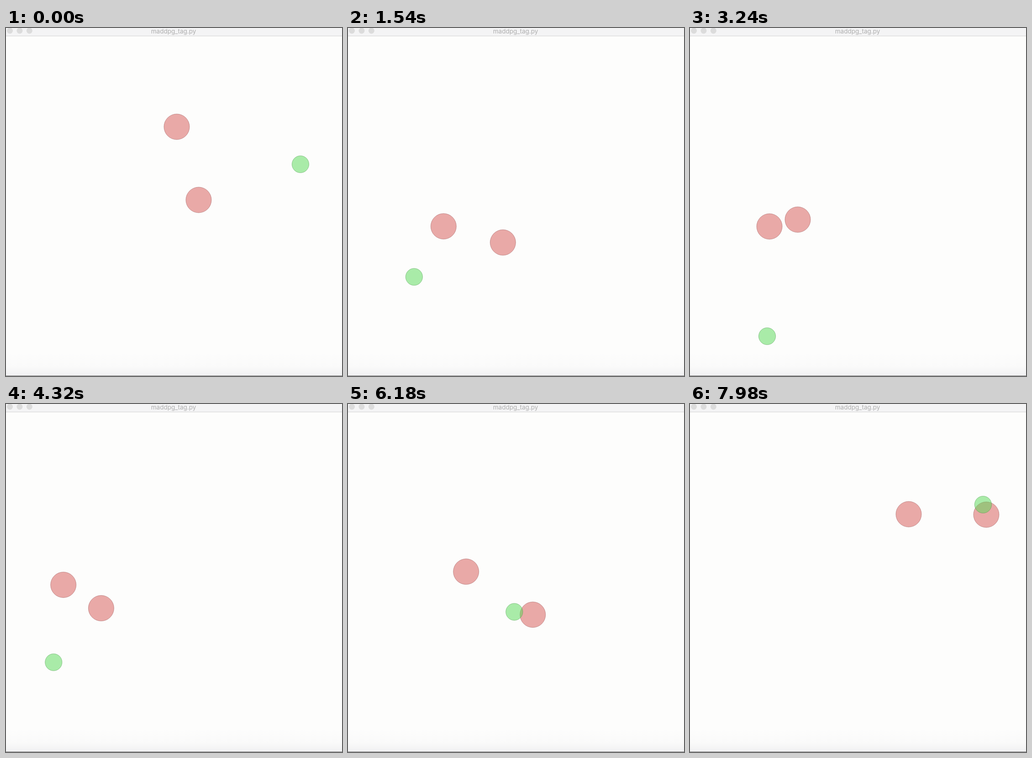
Animation of 736x761 px, one loop 8 s. Source, as an HTML page:

```html
<!DOCTYPE html>
<html lang="en">
<head>
<meta charset="utf-8">
<title>maddpg_tag.py</title>
<style>
  html, body { margin: 0; width: 100%; height: 100%; overflow: hidden; background: #fdfdfc; }
  svg { display: block; width: 100%; height: 100%; }
  text { font: 13.5px Inter, "Liberation Sans", sans-serif; fill: #aeaeae; text-anchor: middle; }
  .chaser { fill: rgba(214, 86, 85, .5); stroke: rgba(140, 65, 65, .45); }
  .runner { fill: rgba(87, 218, 87, .5); stroke: rgba(60, 140, 60, .45); }
</style>
</head>
<body>
<svg viewBox="0 0 736 761">
  <defs>
    <linearGradient id="shade" x1="0" y1="0" x2="0" y2="1">
      <stop offset="0" stop-color="#fdfdfc"/>
      <stop offset=".6" stop-color="#fafafa"/>
      <stop offset="1" stop-color="#f1f1f2"/>
    </linearGradient>
  </defs>
  <rect width="736" height="761" fill="#fdfdfc"/>
  <rect y="710" width="736" height="50" fill="url(#shade)"/>
  <rect y="760" width="736" height="1" fill="#747474"/>
  <rect width="736" height="17" fill="#f4f4f5"/>
  <rect y="17" width="736" height="1" fill="#d3d3d3"/>
  <g id="buttons" fill="#dcdcdc"></g>
  <text x="367" y="12">maddpg_tag.py</text>
  <g id="agents"></g>
</svg>
<script>
const LOOP = 8000;

function addCircle(parent, attrs) {
  const node = document.createElementNS('http://www.w3.org/2000/svg', 'circle');
  document.getElementById(parent).append(node);
  return set(node, attrs);
}

function set(node, attrs) {
  for (const name in attrs) node.setAttribute(name, attrs[name]);
  return node;
}

for (let i = 0; i < 3; i++) addCircle('buttons', { cx: 8.5 + 21.4 * i, cy: 6, r: 6.5 });

function agent(kind, r, ...path) {
  return { path, node: addCircle('agents', { class: kind, r }) };
}

// Each agent steers through a few key points, all reached at the same times
const times = [0, 840, 2220, 3240, 5340, 6980, 7980];
const agents = [
  agent('chaser', 28, [374, 216], [316, 322], [141, 495], [174, 434], [74, 371], [439, 362], [479, 241]),
  agent('chaser', 28, [422, 376], [398, 453], [281, 475], [236, 419], [194, 476], [608, 428], [649, 242]),
  agent('runner', 18.6, [645, 298], [343, 538], [50, 550], [169, 674], [35, 448], [641, 460], [642, 220])
];

// Steps arrive in threes, lasting 20, 20 and 100 ms
function stepAt(ms) {
  const t = ms + 20;
  return 3 * Math.floor(t / 140) + Math.min(2, Math.floor(t % 140 / 20));
}

const keySteps = times.map(stepAt);

// Velocity at a key point: harmonic mean of both sides, zero at a turn
function velocity(path, i, axis) {
  const slope = j => (path[j + 1][axis] - path[j][axis]) / (keySteps[j + 1] - keySteps[j]);
  if (i === 0) return slope(0);
  if (i === path.length - 1) return slope(i - 1);
  const a = slope(i - 1), b = slope(i);
  return a * b > 0 ? 2 * a * b / (a + b) : 0;
}

// Cubic Hermite curve that never overshoots its key points
function position(path, step, axis) {
  let i = 0;
  while (i < path.length - 2 && step >= keySteps[i + 1]) i++;
  const span = keySteps[i + 1] - keySteps[i];
  const u = (step - keySteps[i]) / span, w = 1 - u;
  return w * w * ((1 + 2 * u) * path[i][axis] + u * span * velocity(path, i, axis))
       + u * u * ((3 - 2 * u) * path[i + 1][axis] - w * span * velocity(path, i + 1, axis));
}

function draw(ms) {
  const step = stepAt(ms);
  for (const { path, node } of agents) {
    set(node, { cx: position(path, step, 0), cy: position(path, step, 1) });
  }
}

const start = performance.now();
function tick() {
  draw((performance.now() - start) % LOOP);
  requestAnimationFrame(tick);
}
tick();
</script>
</body>
</html>
```
